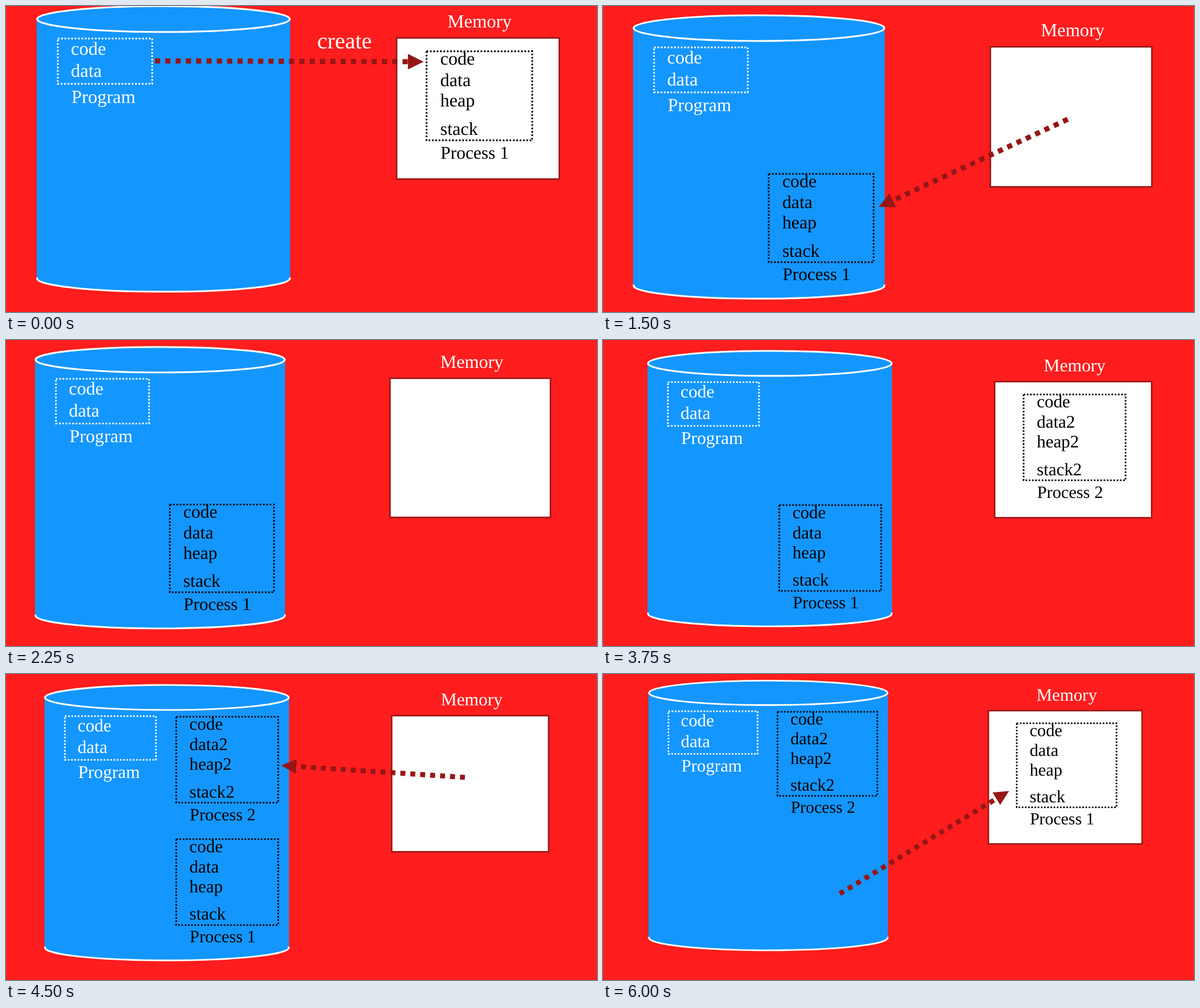
These frames come from a looping animation (1016 by 527 pixels, 6.75 s). An HTML page:

```html
<!DOCTYPE html>
<html lang="en">
<head>
<meta charset="utf-8">
<title>Swapping processes</title>
<style>
html, body { margin: 0; width: 100%; height: 100%; overflow: hidden; background: #ff1d1d; }
svg { display: block; width: 100vw; height: 100vh; }
text { font-family: "Liberation Serif", "Times New Roman", serif; font-size: 32px; text-rendering: geometricPrecision; }
.white { fill: #fff; }
.proc text { font-size: 31.5px; }
.proc .name { font-size: 30.9px; }
.rim { stroke: #fff; stroke-width: 3; }
.dots { fill: none; stroke-width: 2.9; stroke-dasharray: 2.9; }
</style>
</head>
<body>
<svg viewBox="0 0 1016 527">
  <g id="scene">
    <path fill="#1496ff" d="M52.7 22.5V469.5A217.5 22.5 0 0 0 488.5 469.5V22.5Z"/>
    <ellipse class="rim" fill="#1496ff" cx="270.7" cy="22.5" rx="217.2" ry="22.3"/>
    <path class="rim" fill="none" d="M53.5 467.5V469.5A217.2 22.5 0 0 0 488 469.5V467.5"/>
    <rect class="dots" stroke="#fff" x="89" y="56" width="162.3" height="78"/>
    <g class="white">
      <text x="111.5" y="83.5">code</text>
      <text x="111.5" y="122">data</text>
      <text x="112.5" y="166.5">Program</text>
      <text x="759" y="36.5">Memory</text>
    </g>
    <rect x="671.5" y="55" width="279.7" height="243" fill="#fff" stroke="#961616" stroke-width="2.6"/>
    <g id="actors"></g>
  </g>
</svg>
<script>
const STEP = 750;
const NS = "http://www.w3.org/2000/svg";
const DARK = "#961616";
const scene = document.getElementById("scene");
const actors = document.getElementById("actors");

// Offsets of a process block from its place in memory
const MEM = [0, 0], LOW = [-435.5, 197.5], HIGH = [-435.5, -21];

// Arrows: tail x, y, tip x, y
const CREATE = [256, 94.5, 718, 96];
const OUT1 = [805.5, 180.7, 478, 332.8];
const OUT2 = [802, 165.2, 474.5, 143.9];
const BACK1 = [400.8, 389, 709, 201.5];

// view: scale, x, y; p1 and p2: where each process lives
const steps = [
  { view: [1, 0, 0], p1: MEM, arrow: CREATE },
  { view: [1.0185, 4.3, 10.7], p1: MEM },
  { view: [.9925, -.5, 15.7], p1: LOW, arrow: OUT1 },
  { view: [.986, -1.9, 11.7], p1: LOW },
  { view: [.9645, 21.4, 19.5], p1: LOW, p2: MEM, arrow: CREATE },
  { view: [.9645, 25.7, 18.6], p1: LOW, p2: MEM },
  { view: [.9645, 15.4, 18.7], p1: LOW, p2: HIGH, arrow: OUT2 },
  { view: [.998, 1.1, .7], p1: LOW, p2: HIGH },
  { view: [.9443, 28.5, 11.2], p1: MEM, p2: HIGH, arrow: BACK1 }
];

function add(parent, tag, attrs, text = "") {
  const el = document.createElementNS(NS, tag);
  for (const key in attrs) el.setAttribute(key, attrs[key]);
  el.textContent = text;
  parent.appendChild(el);
  return el;
}

function drawProcess([dx, dy], n) {
  const g = add(actors, "g", { class: "proc", transform: `translate(${dx} ${dy})` });
  const suffix = n > 1 ? n : "";
  add(g, "rect", { class: "dots", stroke: "#000", x: 723, y: 78, width: 181.7, height: 153.3 });
  [["code", 101], ["data" + suffix, 137.5], ["heap" + suffix, 173], ["stack" + suffix, 222]]
    .forEach(([label, y]) => add(g, "text", { x: 746.5, y }, label));
  add(g, "text", { class: "name", x: 747, y: 262.5 }, "Process " + n);
}

function drawArrow([x1, y1, x2, y2]) {
  const length = Math.hypot(x2 - x1, y2 - y1);
  const angle = Math.atan2(y2 - y1, x2 - x1) * 180 / Math.PI;
  const g = add(actors, "g", { transform: `translate(${x1} ${y1}) rotate(${angle})` });
  add(g, "path", { d: `M0 0H${length - 26}`, stroke: DARK, "stroke-width": 8.9, "stroke-dasharray": 8.87 });
  add(g, "path", { d: `M${length} 0l-27 -13.3v26.6z`, fill: DARK });
}

function show({ view: [s, x, y], p1, p2, arrow }) {
  scene.setAttribute("transform", `translate(${x} ${y}) scale(${s})`);
  actors.replaceChildren();
  if (p1) drawProcess(p1, 1);
  if (p2) drawProcess(p2, 2);
  if (arrow) drawArrow(arrow);
  if (arrow === CREATE)
    add(actors, "text", { class: "white", x: 535, y: 73, style: "font-size:39.3px" }, "create");
}

const start = performance.now();
let current = -1;

function tick() {
  const index = Math.floor((performance.now() - start) / STEP) % steps.length;
  if (index !== current) show(steps[current = index]);
  requestAnimationFrame(tick);
}
tick();
</script>
</body>
</html>
```
